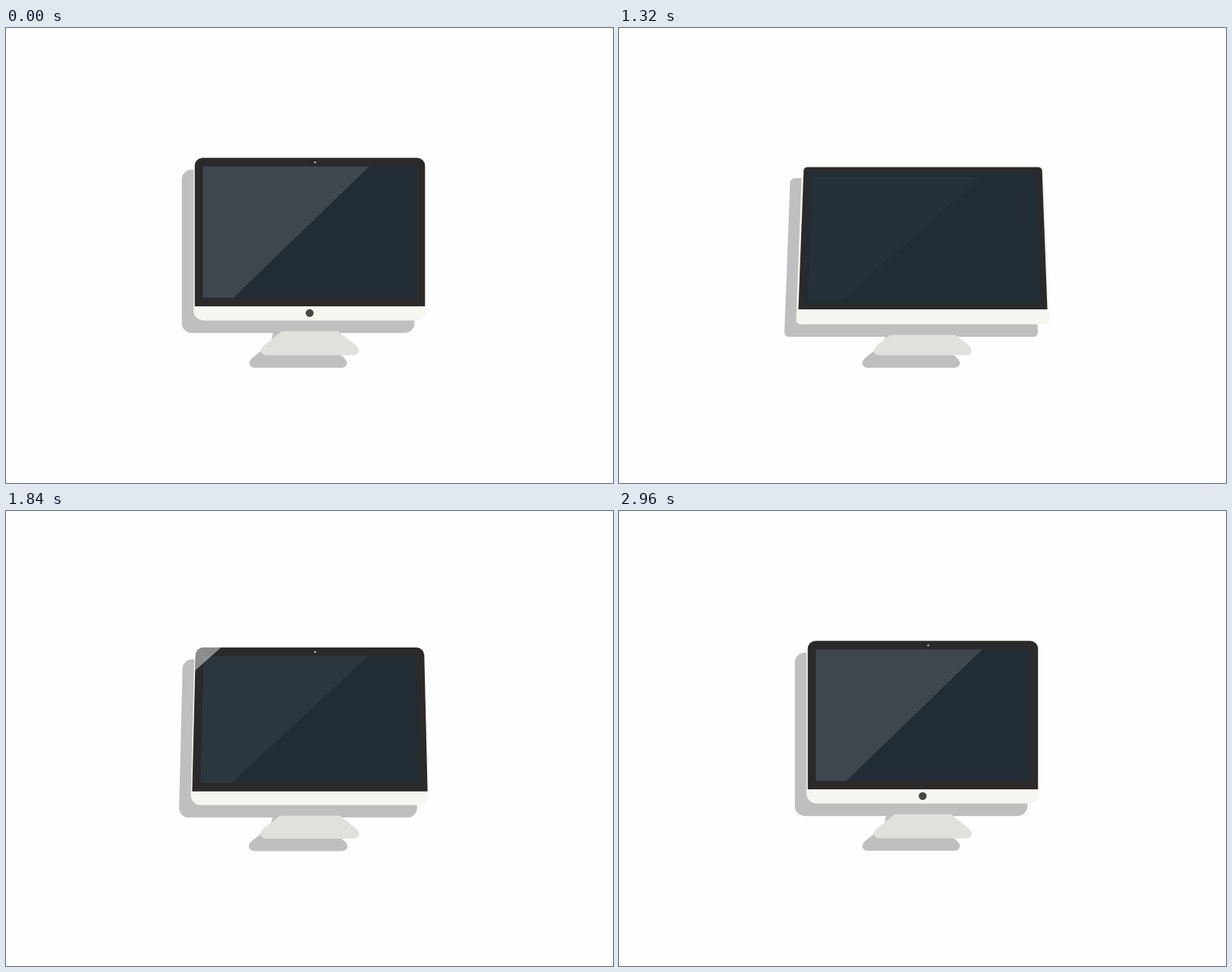
Recreate the animation shown at these times as an HTML page with a canvas. Size 800 by 600 pixels, loop 4.96 s.

```html
<!DOCTYPE html>
<html lang="en">
<head>
<meta charset="utf-8">
<title>Desktop computer</title>
<style>
html, body { margin: 0; width: 100%; height: 100%; overflow: hidden; background: #fefefe; }
canvas { display: block; }
</style>
</head>
<body>
<canvas id="stage" width="800" height="600"></canvas>
<script>
const ctx = document.getElementById('stage').getContext('2d');
const LOOP = 4960, STEP = 40, START = 1000, SETTLED = 2960;
const CX = 400.5, CY = 278, HALF_WIDTH = 153.4, HEIGHT = 215.4, CHIN = 18.6;
const MAX_TILT = 0.419;
const SHADOW = { x: -15.5, y: 16.5, color: '#bfbfbf' };

const clamp = v => Math.min(1, Math.max(0, v));

function ease(t, start, duration) {
  const p = clamp((t - start) / duration);
  return p * p * (3 - 2 * p);
}

// Grows from 0 to 1 in 160 ms, then rings like a damped spring.
function pop(t, start) {
  const grow = clamp((t - start) / 160);
  const x = Math.max(0, t - start - 160) / 1000;
  return grow * (2 - grow) + 0.122 * Math.exp(-3.15 * x) * Math.sin(13 * x);
}

function poly(points, radii = []) {
  const n = points.length, [ax, ay] = points[0], [bx, by] = points[n - 1];
  ctx.beginPath();
  ctx.moveTo((ax + bx) / 2, (ay + by) / 2);
  points.forEach(([x, y], i) => ctx.arcTo(x, y, ...points[(i + 1) % n], radii[i] || 0));
  ctx.closePath();
}

function fill(color, alpha = 1) {
  ctx.globalAlpha = alpha;
  ctx.fillStyle = color;
  ctx.fill();
  ctx.globalAlpha = 1;
}

function dot(x, y, r, color) {
  ctx.beginPath();
  ctx.arc(x, y, r, 0, 2 * Math.PI);
  fill(color);
}

function castShadow(path) {
  ctx.save();
  ctx.translate(SHADOW.x, SHADOW.y);
  path();
  fill(SHADOW.color);
  ctx.restore();
}

function clipped(path, draw) {
  ctx.save();
  path();
  ctx.clip();
  draw();
  ctx.restore();
}

function standPath(scale) {
  ctx.save();
  ctx.translate(CX, 385);
  ctx.scale(scale, scale);
  ctx.beginPath();
  ctx.moveTo(-33, 0);
  ctx.bezierCurveTo(-35, 12, -37, 15, -42, 19);
  ctx.lineTo(-58, 31.5);
  ctx.bezierCurveTo(-68, 39, -65, 46.5, -56, 46.5);
  ctx.lineTo(56, 46.5);
  ctx.bezierCurveTo(65, 46.5, 68, 39, 58, 31.5);
  ctx.lineTo(42, 19);
  ctx.bezierCurveTo(37, 15, 35, 12, 33, 0);
  ctx.closePath();
  ctx.restore();
}

function draw(t) {
  ctx.fillStyle = '#fefefe';
  ctx.fillRect(0, 0, 800, 600);
  const scale = pop(t, START);
  if (scale <= 0) return;

  // The panel leans back, then swings upright.
  const tilt = MAX_TILT * (1 - ease(t, 1560, 720));
  const lean = Math.sin(tilt), squash = scale * Math.cos(tilt);
  const height = HEIGHT * squash;
  const top = CY + 20 * lean - height / 2, bottom = top + height;
  const half = y => HALF_WIDTH * scale * (1 + 0.06 * lean * (2 * (y - top) / height - 1));
  const quad = (y0, y1, inset) => {
    const a = half(y0) - inset, b = half(y1) - inset;
    return [[CX - a, y0], [CX + a, y0], [CX + b, y1], [CX - b, y1]];
  };
  const at = (u, v) => {
    const y = top + v * height;
    return [CX + u * half(y), y];
  };

  const opening = Math.exp((1160 - t) / 60);
  const closed = Math.min(1, opening);
  const round = ease(t, 1500, 320);
  const radius = 6 + 6 * closed + 7 * round;
  const body = () => poly(quad(top, bottom, 0), Array(4).fill(radius));
  const stand = () => standPath(pop(t, 1160));

  castShadow(stand);
  castShadow(body);
  clipped(() => {
    ctx.beginPath();
    ctx.rect(0, bottom + 14, 800, 600);
  }, () => {
    stand();
    fill('#e0e1dc');
  });
  body();
  fill('#f6f6f0');
  dot(400.2, bottom - 9.8, 5.2 * pop(t, 2080), '#464445');

  const edge = 0.4 + 1.2 * round, gap = 29 * opening;
  const y0 = top + edge / 2 + gap * 0.9;
  const y1 = bottom - CHIN * squash - gap * 0.9;
  const bezelInset = edge + gap;
  if (y1 <= y0 || half(y0) <= bezelInset) return;
  const bezelCorners = quad(y0, y1, bezelInset);
  const bezelRadius = 5.5 * (1 - closed) + 5 * round;
  const bezel = () => poly(bezelCorners, [bezelRadius, bezelRadius]);
  const inner = inset => {
    const corners = quad(y0 + inset * 1.07, y1 - inset * 1.07, bezelInset + inset);
    const fits = corners[0][1] < corners[3][1] && corners[0][0] < CX;
    poly(fits ? corners : [[0, 0], [0, 0], [0, 0]]);
  };
  bezel();
  fill('#2c292a');
  inner(5.5 + 5.1 * round + 20 * opening);
  fill('#222c35');
  clipped(() => inner(10.6 + 14.9 * opening), () => {
    poly([at(-1, 0), at(0.592, 0), at(-0.858, 1), at(-1, 1)]);
    fill('#fff', 0.02 + 0.107 * ease(t, 1640, 600));
  });

  const shine = clamp((t - 1800) / 400);
  if (shine > 0 && shine < 1) clipped(bezel, () => {
    const size = 310 * shine + 250 * shine ** 2, [x, y] = bezelCorners[0];
    poly([[x - 5, y], [x + size, y], [x - 5, y + size * 0.9 + 4]]);
    fill('#fff', 0.51 * (1 - shine));
  });

  const camera = pop(t, 1640), cameraY = y0 + 6;
  dot(401.5, cameraY, 2.3 * camera, '#1d2a31');
  dot(401.5, cameraY, 1.1 * camera, '#2c292a');
  dot(407.5, cameraY, 1.1 * camera, '#e4e5df');
}

function frame() {
  const t = Math.floor(performance.now() % LOOP / STEP) * STEP;
  draw(t < START ? SETTLED : Math.min(t, SETTLED));
  requestAnimationFrame(frame);
}
frame();
</script>
</body>
</html>
```
